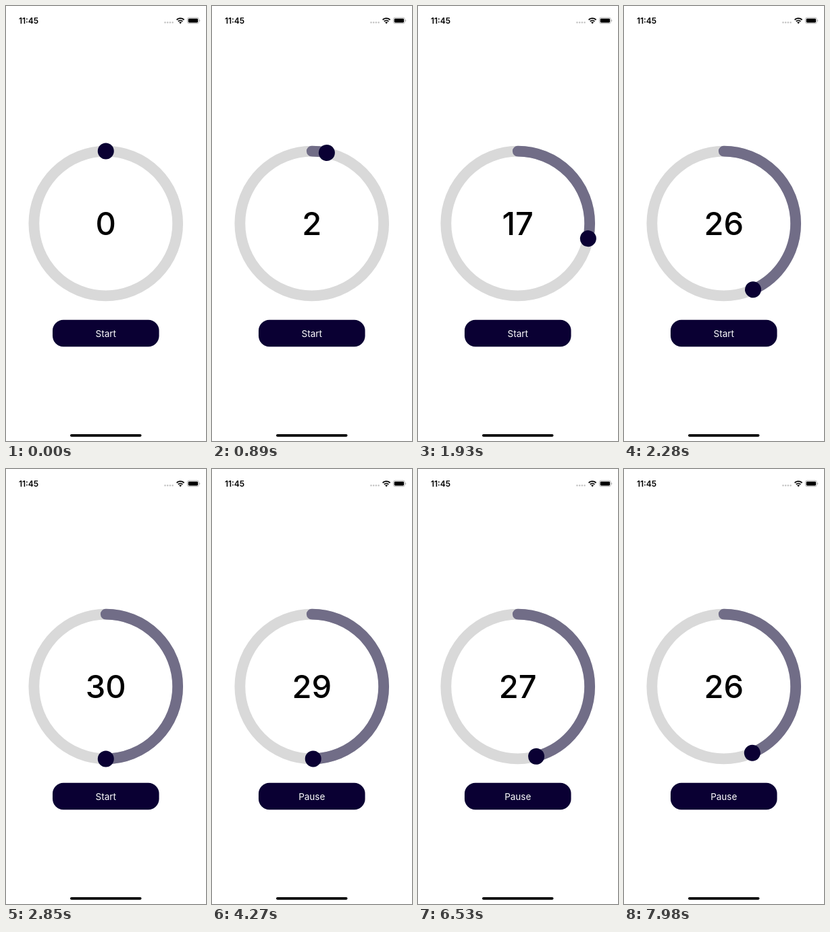
Animation, 296 px wide and 640 px high, one loop 8000 ms. Source, as an HTML page:

```html
<!DOCTYPE html>
<html lang="en">
<head>
<meta charset="utf-8">
<title>Timer</title>
<style>
  html, body { margin: 0; width: 100%; height: 100%; overflow: hidden; background: #fff; }
  svg { display: block; }
  text { font-family: Inter, Roboto, sans-serif; }
  .ring { fill: none; stroke-width: 15.8; }
  .navy { fill: #0a0033; }
  .middle { text-anchor: middle; }
</style>
</head>
<body>
<svg width="296" height="640" viewBox="0 0 296 640">
  <text x="18.9" y="26" font-size="12" font-weight="600">11:45</text>
  <path d="M235.5 24.2h12" stroke="#c4c4c4" stroke-width="2.6" stroke-linecap="round" stroke-dasharray="0 3.7"/>
  <g fill="none" stroke="#000" stroke-width="1.8">
    <path d="M252.6 20.3a7.9 7.9 0 0 1 11 0"/>
    <path d="M254.8 22.6a4.8 4.8 0 0 1 6.6 0"/>
  </g>
  <path d="M258.1 26.2l-2-2.1a3 3 0 0 1 4 0z"/>
  <rect x="268.4" y="17.1" width="17" height="8.6" rx="2.5" fill="none" stroke="#a8a8a8" stroke-width=".8"/>
  <rect x="269.7" y="18.4" width="14.4" height="6" rx="1.4"/>
  <path d="M286.3 20v2.9q1-.4 1-1.45t-1-1.45z" fill="#a8a8a8"/>

  <g transform="translate(147.75 320)">
    <g transform="rotate(-90)">
      <circle class="ring" r="106.4" stroke="#d9d9d9"/>
      <circle class="ring" id="arc" r="106.4" pathLength="60" stroke="#716d87" stroke-linecap="round"/>
      <circle class="navy" id="knob" cx="106.4" r="12"/>
    </g>
    <text class="middle" id="count" y="17" font-size="47" font-weight="500"></text>
    <rect class="navy" x="-78.8" y="141.7" width="157.6" height="39.5" rx="16"/>
    <text class="middle" id="label" y="166.7" font-size="13.5" fill="#fff"></text>
    <rect x="-52.8" y="309.9" width="105.6" height="3.9" rx="1.95"/>
  </g>
</svg>
<script>
const LOOP = 8000;
const FULL = 30;
const DRAG = { start: 740, end: 2850, refresh: 118 };
const COUNT = { start: 3990, firstTick: 4170, refresh: 102.6, msPerSecond: 1024 };
// Drag speed: time in ms, seconds set so far
const dragKeys = [[740, 1], [1330, 5], [1920, 17], [2390, 29]];

const $ = id => document.getElementById(id);
const snap = (t, from, step) => from + Math.floor((t - from) / step) * step;

function interpolate(keys, t) {
  const next = keys.findIndex(([at]) => at > t);
  if (next < 0) return keys.at(-1)[1];
  const [[t0, v0], [t1, v1]] = keys.slice(next - 1);
  return v0 + (v1 - v0) * (t - t0) / (t1 - t0);
}

function secondsAt(t) {
  if (t < DRAG.start) return 0;
  if (t < DRAG.end) return Math.round(interpolate(dragKeys, snap(t, DRAG.start, DRAG.refresh)));
  if (t < COUNT.firstTick) return FULL;
  return FULL - (snap(t, COUNT.firstTick, COUNT.refresh) - COUNT.start) / COUNT.msPerSecond;
}

function draw() {
  const t = performance.now() % LOOP;
  const s = secondsAt(t);
  $('arc').setAttribute('stroke-dasharray', `${s} 100`);
  $('knob').setAttribute('transform', `rotate(${s * 6})`);
  $('count').textContent = Math.floor(s);
  $('label').textContent = t < COUNT.start ? 'Start' : 'Pause';
  requestAnimationFrame(draw);
}
draw();
</script>
</body>
</html>
```
